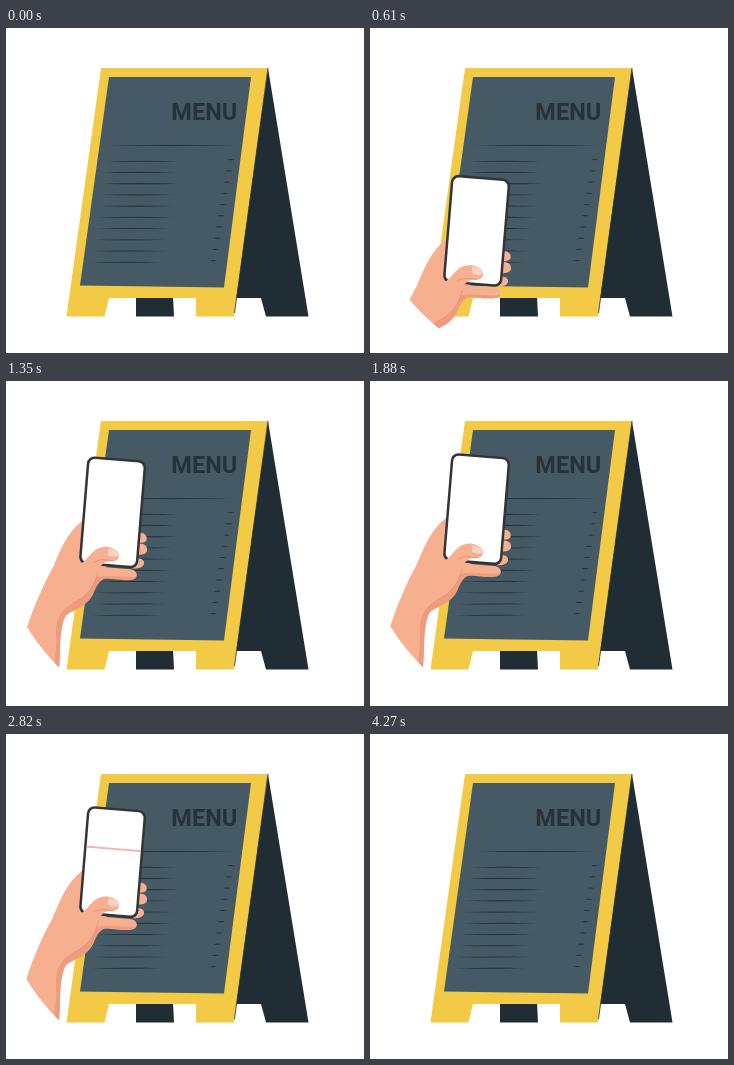
An HTML page for the animation above (4310 ms loop, 358 by 325 pixels).

```html
<!DOCTYPE html>
<html lang="en">
<head>
<meta charset="utf-8">
<title>Menu board</title>
<style>
  html, body { margin: 0; width: 100%; height: 100%; overflow: hidden; background: #fff; }
  svg { display: block; width: 100vw; height: 100vh; }
  text { font: 700 23.5px Roboto, Inter, sans-serif; text-anchor: middle; }
  .dark { fill: #212d35; }
  .ink { fill: #263238; }
  .yellow { fill: #f2ca45; }
  .skin { fill: #f7b08f; }
  .shade { fill: #ee9c7e; }
  .crease { fill: none; stroke: #e58f72; stroke-width: .8; stroke-linecap: round; }
</style>
</head>
<body>
<svg viewBox="0 0 358 325">
  <clipPath id="stageCircle"><circle cx="196.6" cy="139" r="205.7"/></clipPath>

  <g id="board">
    <path class="dark" d="M262 40 L302.5 288.5 H260 L255 270 H229 Z M130 268 H167 L168 288.5 H130 Z"/>
    <path class="yellow" d="M95 40 H262 L228 288.5 H190 V270 H103 L98.500 288.500 H60.500 Z"/>
    <path d="M262 40 L228.500 285" stroke="#212d35" stroke-width=".8"/>
    <path fill="#455a64" d="M103 49 H245 L218 259.500 L74 257.500 Z"/>
    <text class="ink" x="198.300" y="92.300">MENU</text>
    <path id="rules" class="ink"/>
  </g>

  <g clip-path="url(#stageCircle)">
    <g id="hand">
      <path class="skin" d="M80 134 C62 146 55 164 47 183 C37 201 28 222 21 243 L0 300 L48 340 L53 287 C55 268 51 243 60 231 C70 224 81 222 87 210 C91 200 93 196 99 194 L104 150 Z"/>
      <path class="shade" d="M92 187 C89 203 80 213 67 219 C53 226 50 237 50 250 C51 263 48 274 48 290 L48 340 L53 287 C55 268 53 243 60 231 C70 224 81 222 87 210 C91 200 94 196 100 194 Z"/>
      <path class="skin" d="M130 149 C137 147 142 151 140.500 156 C139 159 134 159 130 158 Z
        M129 160 C137 158 142 161 141 167 C139 171 134 171 129 170 Z
        M126 174 C134 173 139 175 138 180 C136 184 131 185 126 184 Z"/>
      <path class="skin" d="M88 182 L124 185 C133 186 133 195 125 195.500 C115 196 104 192 92 195 Z"/>
      <path class="shade" d="M91 193 C104 190 116 194 130 192.500 C128 196 124 196 119 196 C110 196 102 193 91 196 Z"/>

      <g transform="translate(106.6 128.200) rotate(4.7)">
        <rect x="-29.700" y="-54.300" width="59.400" height="108.600" rx="7.500" fill="#343337"/>
        <rect x="-27.200" y="-51.800" width="54.400" height="103.600" rx="5.500" fill="#fff"/>
        <g id="dish" class="yellow">
          <circle cx=".5" cy="-30.300" r="2.200"/>
          <path d="M-18.500 -10.300 C-18.500 -22 -10 -29 .5 -29 S19.500 -22 19.500 -10.300 Z"/>
          <path d="M-14.500 -14 C-13.500 -20 -10 -23.500 -5.500 -25" fill="none" stroke="#f9e4a0" stroke-width="1"/>
          <rect x="-20.300" y="-8.700" width="41" height="2.400" rx="1"/>
          <text x=".4" y="11" style="font-size:16px">MENU</text>
        </g>
        <rect id="scan" x="-27.200" y="-.9" width="54.400" height="1.800" fill="#f7aeac"/>
      </g>

      <path class="skin" d="M72 181 C81 178 85 166 94 163.500 C101 161 109 164 112 168 C115 174 111 177.500 104 177 C98 177 94 181 92 188 C88 204 78 214 66 219 C60 210 62 190 72 181 Z"/>
      <path d="M102 165 C107 163.500 113 167 112.500 171 C111 174 104 173 102 170 Z" fill="#fbd2bf"/>
      <path class="crease" d="M88 178 C94 174 101 176 107 177 M92 188 C89 203 80 213 67 219"/>
    </g>
  </g>
</svg>
<script>
const LOOP = 4310, START_Y = 254, RISE = 1600, EXIT = 4210;
const byId = id => document.getElementById(id);
const hand = byId('hand'), dish = byId('dish'), scan = byId('scan');
const clamp = v => Math.min(1, Math.max(0, v));
const ramp = (t, from, to) => clamp((t - from) / (to - from));

// Thin stroke that tapers towards both ends.
const taper = (x1, x2, y, h = 1.1) => {
  const mid = (x1 + x2) / 2;
  return `M${x1} ${y}Q${mid} ${y - h} ${x2} ${y}Q${mid} ${y + h} ${x1} ${y}Z`;
};

const rowEnds = [172, 168, 173, 167, 168, 167, 163, 159, 160, 155];
byId('rules').setAttribute('d', taper(103, 229, 117.5) + rowEnds.map((end, i) => {
  const drop = 11.22 * i, tick = 221 - 1.95 * i;
  return taper(100 - 1.65 * i, end, 133.2 + drop) + taper(tick, tick + 7.5, 131.6 + drop, 1.2);
}).join(''));

// Cubic Bezier easing solved by bisection.
function ease(p, x1, y1, x2, y2) {
  const at = (s, a, b) => 3 * (1 - s) ** 2 * s * a + 3 * (1 - s) * s * s * b + s ** 3;
  let lo = 0, hi = 1;
  for (let i = 0; i < 24; i++) {
    const mid = (lo + hi) / 2;
    if (at(mid, x1, x2) < p) lo = mid; else hi = mid;
  }
  return at(lo, y1, y2);
}

function draw(t) {
  const y = t < EXIT + 30
    ? START_Y * (1 - ease(clamp(t / RISE), .2, .1, .2, 1))
    : START_Y * ramp(t, EXIT, 4271);
  hand.setAttribute('transform', `translate(0 ${y.toFixed(2)})`);
  hand.setAttribute('visibility', t < 40 ? 'hidden' : 'visible');

  dish.setAttribute('opacity', ramp(t, 2840, 3270));
  const scanY = -37.5 + .0423 * (t - 2250);
  scan.setAttribute('transform', `translate(0 ${scanY.toFixed(2)})`);
  scan.setAttribute('opacity', t < 2250 ? 0 : 1 - ramp(t, 3350, 3450));
}

const begin = performance.now();
function tick() {
  draw((performance.now() - begin) % LOOP);
  requestAnimationFrame(tick);
}
tick();
</script>
</body>
</html>
```
